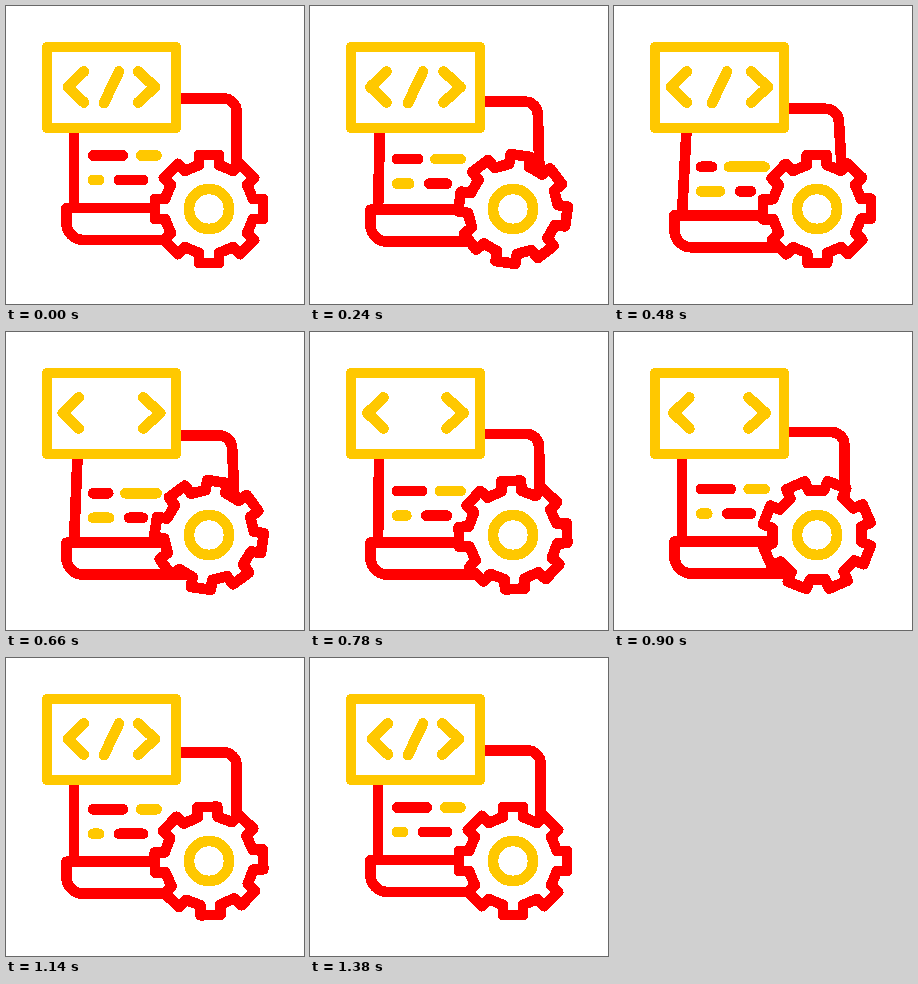
Write an HTML page that moves like this. It is 298 px wide and 298 px high and loops after 1.5 s.

```html
<!DOCTYPE html>
<html lang="en">
<head>
<meta charset="utf-8">
<title>Code settings</title>
<style>
  html, body { margin: 0; height: 100%; overflow: hidden; background: #fff; }
  svg { display: block; width: 100vw; height: 100vh; shape-rendering: crispEdges; }
  path, circle { fill: none; stroke-width: 10.7; stroke-linecap: round; stroke-linejoin: round; }
  .red { stroke: #f00; }
  .gold { stroke: #ffc800; }
  .solid { fill: #fff; }
  #panel { stroke-width: 10; }
</style>
</head>
<body>
<svg viewBox="0 0 298 298">
  <path id="screen" class="red"/>
  <path id="redLines" class="red"/>
  <path id="goldLines" class="gold"/>
  <path id="base" class="red" d="M200 202H60.5V217A17 17 0 0 0 77.5 234H200"/>
  <path id="panel" class="gold solid" d="M41 41H170V122H41Z"/>
  <path id="left" class="gold" d="M78 65.5L62 81L78 96.5"/>
  <path id="right" class="gold" d="M132 65.5L149 81L132 96.5"/>
  <path id="slash" class="gold"/>
  <path id="gear" class="red solid"/>
  <circle class="gold" cx="203" cy="203" r="20"/>
</svg>
<script>
const $ = id => document.getElementById(id);
const LOOP = 1500, STEP = 30;

const clamp = u => Math.min(1, Math.max(0, u));
const ease = u => u < .5 ? .5 * (2 * u) ** 2.5 : 1 - .5 * (2 - 2 * u) ** 2.5;
const ramp = (t, from, to) => ease(clamp((t - from) / (to - from)));
const swing = (t, peak, end) => t < peak ? ramp(t, 0, peak) : 1 - ramp(t, peak, end);
const mix = (a, b, u) => a + (b - a) * u;

// Eight square teeth joined by straight valleys
function gearPath() {
  const points = [];
  for (let i = 0; i < 8; i++) {
    const c = Math.cos(i * Math.PI / 4), s = Math.sin(i * Math.PI / 4);
    for (const [x, y] of [[-10, -44], [-10, -54], [10, -54], [10, -44]])
      points.push([x * c - y * s, x * s + y * c].map(v => v.toFixed(2)));
  }
  return `M${points.join('L')}Z`;
}

function draw(t) {
  const drop = 8.7 * swing(t, 700, 1380);
  const tilt = swing(t, 490, 960);
  const spread = 5.3 * swing(t, 600, 1200);

  const top = 92.5 + drop + 3 * tilt, bottom = 202 + drop, inset = 5.6 * tilt;
  const l = 68 + inset, r = 230.5 - inset;
  $('screen').setAttribute('d',
    `M68 ${bottom}L${l} ${top}H${r - 13}A13 13 0 0 1 ${r} ${top + 13}L230.5 ${bottom}`);

  const row1 = 149.5 + drop + 4 * tilt, row2 = 174 + drop + 4 * tilt;
  $('redLines').setAttribute('d',
    `M87 ${row1}H${mix(117, 98, tilt)}M${mix(113, 126, tilt)} ${row2}H137`);
  $('goldLines').setAttribute('d',
    `M${mix(135, 115, tilt)} ${row1}H150.5M87 ${row2}H${mix(93, 106, tilt)}`);
  $('base').setAttribute('transform', `translate(0 ${drop})`);

  $('left').setAttribute('transform', `translate(${-spread} 0)`);
  $('right').setAttribute('transform', `translate(${spread} 0)`);

  const shown = 1 - ramp(t, 480, 630) + ramp(t, 930, 1110);
  $('slash').setAttribute('d', shown > .001
    ? `M113 65.5L${mix(113, 98, shown)} ${mix(65.5, 97, shown)}` : '');

  $('gear').setAttribute('transform', `translate(203 203) rotate(${180 * ramp(t, 0, 1270)})`);
}

const start = performance.now();
function tick() {
  const t = (performance.now() - start) % LOOP;
  draw(Math.floor(t / STEP) * STEP);
  requestAnimationFrame(tick);
}
$('gear').setAttribute('d', gearPath());
tick();
</script>
</body>
</html>
```
